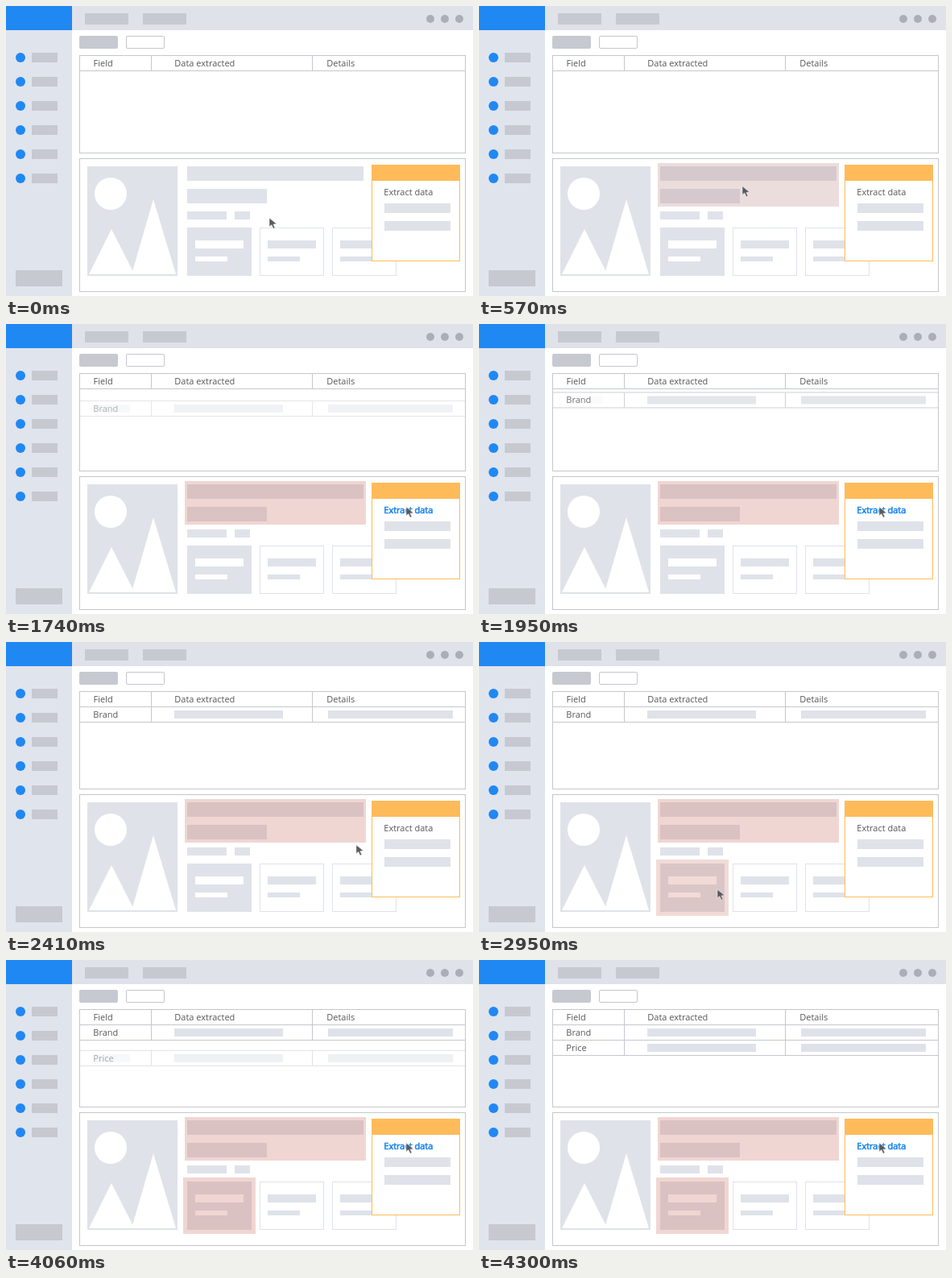
An HTML page with a canvas that plays this animation: 580x360 px, repeating every 4530 ms.

```html
<!DOCTYPE html>
<html lang="en">
<head>
<meta charset="utf-8">
<title>Data extraction</title>
<style>
html, body { margin: 0; width: 100%; height: 100%; overflow: hidden; background: #fff; }
canvas { display: block; }
</style>
</head>
<body>
<canvas id="stage" width="580" height="360"></canvas>
<script>
const ctx = document.getElementById('stage').getContext('2d');
const LOOP = 4530;
const BLUE = '#2088f3', PALE = '#dfe2e9', GREY = '#c6c9d0', LINE = '#c5c7cd', ORANGE = '#ffbb59';
const INK = [88, 88, 90], ACTIVE = [26, 134, 240];
const HOVER = [192, 143, 143], PICKED = [205, 120, 106];

// Cursor path: start time, end time, from, to, easing power
const START = [327, 263], TITLE = [327, 223.5], MENU = [497, 227], CARD = [296, 307];
const MOVES = [
  [0, 570, START, TITLE, 1.4],
  [600, 1125, TITLE, MENU, 1.7],
  [2170, 2950, MENU, CARD, 1],
  [3240, 3790, CARD, MENU, 1.7]
];

const ramp = (t, a, b) => Math.min(1, Math.max(0, (t - a) / (b - a)));
const mix = (a, b, k) => a.map((v, i) => v + (b[i] - v) * k);
const rgb = c => `rgb(${c.map(Math.round).join()})`;

function box(x, y, w, h, color) {
  ctx.fillStyle = color;
  ctx.fillRect(x, y, w, h);
}

function frame(x, y, w, h, color) {
  ctx.strokeStyle = color;
  ctx.lineWidth = 1;
  ctx.strokeRect(x + .5, y + .5, w - 1, h - 1);
}

function dot(x, y, r, color) {
  ctx.fillStyle = color;
  ctx.beginPath();
  ctx.arc(x, y, r, 0, 7);
  ctx.fill();
}

function poly(points, color) {
  ctx.fillStyle = color;
  ctx.beginPath();
  for (const [x, y] of points) ctx.lineTo(x, y);
  ctx.closePath();
  ctx.fill();
}

function label(text, x, y, color = rgb(INK)) {
  ctx.font = '11px "Open Sans", "Noto Sans", sans-serif';
  ctx.fillStyle = color;
  ctx.fillText(text, x, y);
}

function chrome() {
  box(0, 0, 580, 360, '#fff');
  box(82, 0, 498, 30, PALE);
  box(0, 30, 82, 330, '#e0e4ec');
  box(0, 0, 82, 30, BLUE);
  box(98, 9, 54, 14, GREY);
  box(170, 9, 54, 14, GREY);
  for (let i = 0; i < 3; i++) dot(527 + 18 * i, 16, 5, '#abaeb7');
  for (let i = 0; i < 6; i++) {
    dot(18, 64 + 30 * i, 6, BLUE);
    box(32, 58 + 30 * i, 32, 12, GREY);
  }
  box(12, 328, 58, 20, GREY);
  ctx.fillStyle = GREY;
  ctx.strokeStyle = LINE;
  ctx.lineWidth = 1;
  ctx.beginPath();
  ctx.roundRect(91, 37, 48, 16, 2);
  ctx.fill();
  ctx.beginPath();
  ctx.roundRect(149.5, 37.5, 47, 15, 1.5);
  ctx.stroke();
}

function rowLines(top) {
  box(92, top + 19, 478, 1, LINE);
  box(180, top + 1, 1, 18, LINE);
  box(380, top + 1, 1, 18, LINE);
}

function row(name, top, k) {
  if (k <= 0) return;
  const y = top + 27 * (1 - k);
  ctx.globalAlpha = k;
  if (k < 1) box(92, y, 478, 1, LINE);
  rowLines(y);
  box(209, y + 5, 135, 10, PALE);
  box(400, y + 5, 155, 10, PALE);
  ctx.globalAlpha = k * (1 - k);
  box(109, y + 5, 45, 10, PALE);
  ctx.globalAlpha = k;
  label(name, 108.3, y + 14);
  ctx.globalAlpha = 1;
}

function table(t) {
  frame(91, 61, 480, 122, LINE);
  rowLines(61);
  label('Field', 108.5, 75);
  label('Data extracted', 209.3, 75);
  label('Details', 398.3, 75);
  row('Brand', 80, ramp(t, 1500, 2040));
  row('Price', 99, ramp(t, 3810, 4290));
}

function page() {
  frame(91, 189, 480, 166, LINE);
  box(101, 199, 112, 136, PALE);
  dot(130, 233, 20, '#fff');
  poly([[131, 277], [103, 333], [159.5, 333]], '#fff');
  poly([[183, 240], [156, 333], [211, 333]], '#fff');
  box(225, 199, 219, 18, PALE);
  box(225, 227, 99, 18, PALE);
  box(225, 255, 49, 10, PALE);
  box(284, 255, 19, 10, PALE);
  for (let i = 0; i < 3; i++) {
    const x = 225 + 90 * i, bar = i ? PALE : '#fff';
    if (i) frame(x, 275, 80, 60, PALE);
    else box(x, 275, 80, 60, PALE);
    box(x + 10, 291, 60, 10, bar);
    box(x + 10, 311, 40, 6, bar);
  }
}

function tint(x, y, w, h, color, k) {
  ctx.globalAlpha = .3 * k;
  box(x, y, w, h, rgb(color));
  ctx.globalAlpha = 1;
}

function popup(t) {
  box(454, 197, 110, 120, '#fff');
  frame(454, 197, 110, 120, ORANGE);
  box(454, 197, 110, 20, ORANGE);
  const on = t < 3000
    ? ramp(t, 1125, 1335) - ramp(t, 1980, 2170)
    : ramp(t, 3790, 4000);
  const color = rgb(mix(INK, ACTIVE, on));
  label('Extract data', 469.3, 235, color);
  if (on > 0) {
    ctx.globalAlpha = on;
    ctx.strokeStyle = color;
    ctx.lineWidth = .6;
    ctx.strokeText('Extract data', 469.3, 235);
    ctx.globalAlpha = 1;
  }
  box(470, 245, 82, 12, PALE);
  box(470, 267, 82, 12, PALE);
}

function cursor(t) {
  let pos = START;
  for (const [a, b, from, to, power] of MOVES) {
    if (t >= a) pos = mix(from, to, ramp(t, a, b) ** power);
  }
  ctx.save();
  ctx.translate(...pos);
  ctx.strokeStyle = '#fff';
  ctx.lineWidth = 1.2;
  ctx.lineJoin = 'round';
  poly([[0, 0], [0, 11], [2.8, 8.8], [5, 13.2], [7, 12.2], [5, 8], [9, 7.4]], '#58595e');
  ctx.globalCompositeOperation = 'destination-over';
  ctx.globalCompositeOperation = 'source-over';
  ctx.globalAlpha = .45;
  ctx.stroke();
  ctx.restore();
}

function draw(t) {
  chrome();
  table(t);
  page();
  tint(222, 195, 225, 54, mix(HOVER, PICKED, ramp(t, 600, 1120)), ramp(t, 300, 570));
  tint(220, 270, 90, 70, PICKED, ramp(t, 2715, 2980));
  popup(t);
  cursor(t);
}

const begin = performance.now();
function tick() {
  draw((performance.now() - begin) % LOOP);
  requestAnimationFrame(tick);
}
tick();
</script>
</body>
</html>
```
